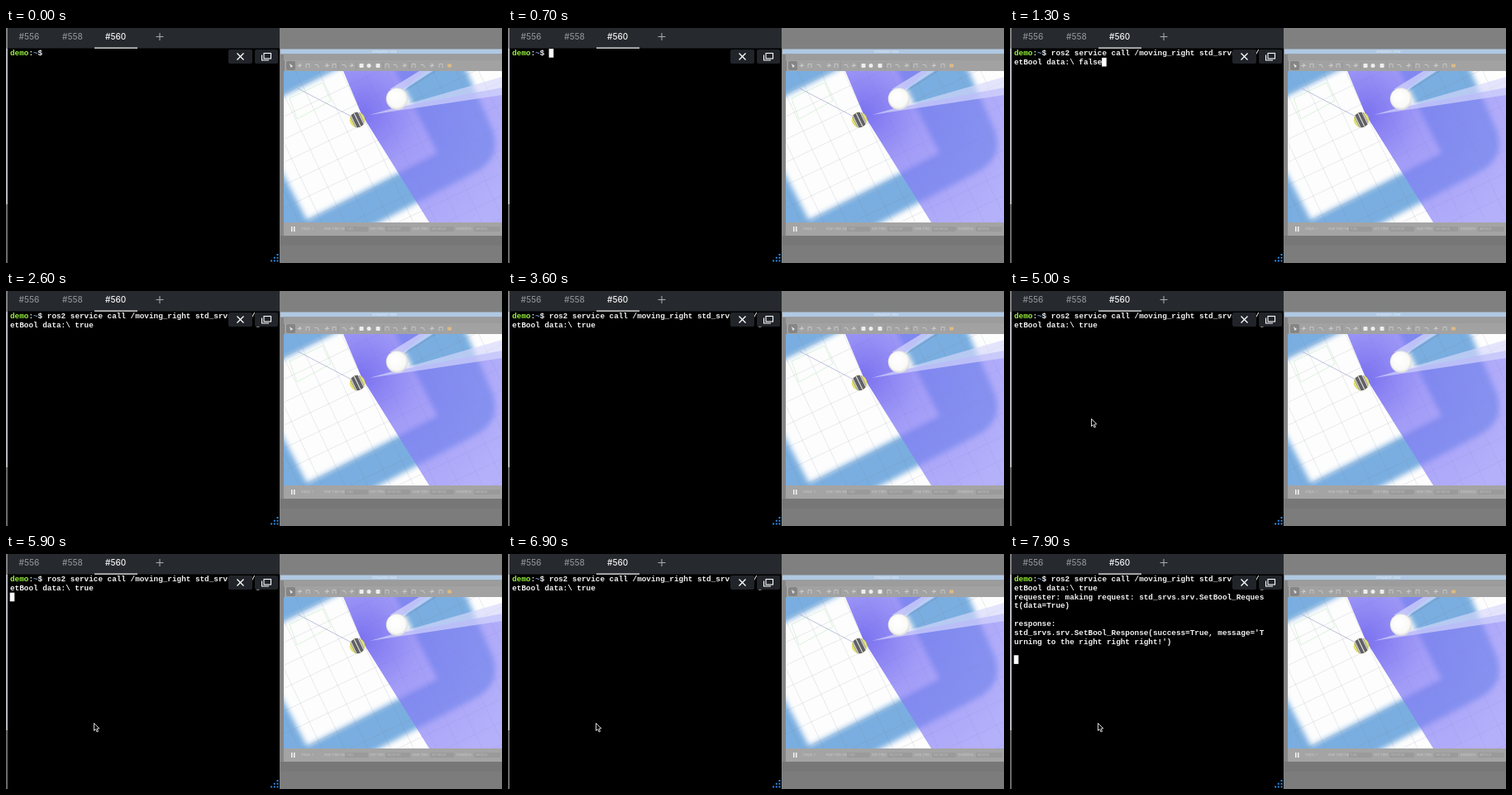
An HTML page with a canvas for the animation above (8 s loop, 600 px wide and 284 px high).

```html
<!DOCTYPE html>
<html lang="en">
<head>
<meta charset="utf-8">
<title>Robot terminal</title>
<style>
html, body { margin: 0; width: 100%; height: 100%; overflow: hidden; background: #808080; }
canvas { display: block; width: 600px; height: 284px; }
</style>
</head>
<body>
<canvas id="stage" width="600" height="284"></canvas>
<script>
const W = 600, H = 284, LOOP = 8000;
const CHAR = 5.6, LINE = 10.8, LEFT = 5, TOP = 30.7;
const MONO = 'bold 9.33px "Liberation Mono", monospace';
const SANS = 'Inter, sans-serif';
const BLINK = 600;

const COMMAND = 'ros2 service call /moving_right std_srvs/srv/S';
const REQUEST = ['requester: making request: std_srvs.srv.SetBool_Reques', 't(data=True)'];
const RESPONSE = ['', 'response:', "std_srvs.srv.SetBool_Response(success=True, message='T",
  "urning to the right right right!')"];

// Key times in ms
const RECALL = 1000, RECALL_NEXT = 1500, ENTER = 5800, SENT = 7600, REPLY = 7700;
const POINTER = { show: 4700, from: 5150, to: 5550 };

const stage = document.getElementById('stage').getContext('2d');

function rect(c, color, x, y, w, h, r = 0) {
  c.fillStyle = color;
  c.beginPath();
  c.roundRect(x, y, w, h, r);
  c.fill();
}

function poly(c, color, ...points) {
  c.fillStyle = color;
  c.beginPath();
  points.forEach(p => c.lineTo(...p));
  c.closePath();
  c.fill();
}

function line(c, color, width, ...points) {
  c.strokeStyle = color;
  c.lineWidth = width;
  c.beginPath();
  points.forEach((p, i) => i ? c.lineTo(...p) : c.moveTo(...p));
  c.stroke();
}

function disc(c, color, x, y, r) {
  c.fillStyle = color;
  c.beginPath();
  c.arc(x, y, r, 0, Math.PI * 2);
  c.fill();
}

function label(c, text, x, y, font, color) {
  c.font = font;
  c.fillStyle = color;
  c.textBaseline = 'middle';
  c.fillText(text, x, y);
}

function drawTrack(c) {
  c.save();
  c.filter = 'blur(3px)';
  c.fillStyle = '#7aaee0';
  c.beginPath();
  c.moveTo(320, 40);
  c.lineTo(552, 40);
  c.lineTo(588, 122);
  c.quadraticCurveTo(602, 158, 564, 176);
  c.lineTo(432, 245);
  c.lineTo(320, 245);
  c.fill();
  poly(c, '#fdfdfd', [320, 90], [336, 82], [420, 40], [465, 40], [522, 151], [364, 232], [336, 178], [320, 147]);
  c.restore();
}

function drawGrid(c) {
  c.save();
  c.translate(425, 111);
  c.rotate(-0.445);
  for (let i = -12; i <= 12; i++) {
    const p = i * 25 + 8;
    line(c, 'rgba(120,125,135,.2)', 0.7, [p, -300], [p, 300]);
    line(c, 'rgba(120,125,135,.2)', 0.7, [-300, p], [300, p]);
  }
  c.restore();
}

function drawLaser(c) {
  const glow = c.createRadialGradient(430, 104, 5, 430, 104, 190);
  glow.addColorStop(0, 'rgba(108,98,238,.88)');
  glow.addColorStop(0.35, 'rgba(130,122,245,.74)');
  glow.addColorStop(1, 'rgba(143,136,248,.66)');
  poly(c, glow, [408, 52], [508, 52], [473, 80], [473, 96], [600, 72], [600, 235], [512, 235], [430, 104]);
  poly(c, 'rgba(216,218,252,.7)', [464, 74], [500, 52], [516, 52], [482, 74]);
  poly(c, 'rgba(216,218,252,.66)', [440, 105], [600, 59], [600, 81]);
}

function drawBall(c) {
  const shade = c.createRadialGradient(470, 82, 3, 473, 85.5, 13.5);
  shade.addColorStop(0, '#ffffff');
  shade.addColorStop(0.75, '#f9f9f6');
  shade.addColorStop(1, '#d8d8da');
  disc(c, shade, 473, 85.5, 13.3);
}

function drawRobot(c) {
  c.save();
  c.translate(425, 111);
  c.rotate(-0.45);
  disc(c, '#e2e070', 0, 0, 9.3);
  c.clip();
  rect(c, '#606066', -6, -10, 12, 20);
  [-5, 0, 5].forEach(x => line(c, '#e4e4e0', 1.1, [x, -9], [x, 9]));
  c.restore();
}

function drawWorld(c) {
  c.save();
  c.beginPath();
  c.rect(336, 52, 264, 183);
  c.clip();
  rect(c, '#fdfdfd', 336, 52, 264, 183);
  drawTrack(c);
  drawGrid(c);
  line(c, 'rgba(130,215,130,.4)', 0.7, [343, 85], [383, 66], [393, 88], [352, 110], [343, 85]);
  drawLaser(c);
  line(c, '#a3a6cc', 0.7, [353, 73], [418, 107]);
  line(c, 'rgba(110,110,150,.5)', 0.7, [482, 76], [520, 52]);
  drawBall(c);
  drawRobot(c);
  c.restore();
}

function drawToolbar(c) {
  rect(c, '#a2a2a2', 337, 39, 263, 13);
  rect(c, '#858585', 339, 40, 11, 11, 2);
  poly(c, '#e4e4e4', [343, 43], [347, 46], [344.5, 48]);
  const icons = [355, 365, 376, 388, 397, 409, 418, 430, 439, 450, 461, 471, 482, 493, 504, 515, 526];
  icons.forEach((x, i) => {
    if (i > 6 && i < 10) rect(c, '#eeeeee', x - 2.5, 43, 5, 5, i === 8 ? 2.5 : 1);
    else if (i % 3 === 0) line(c, '#cecece', 0.9, [x - 2.5, 45.5], [x + 2.5, 45.5], [x, 43], [x, 48]);
    else if (i % 3 === 1) line(c, '#cacaca', 0.9, [x - 2, 48], [x - 2, 43.5], [x + 2, 43.5], [x + 2, 48]);
    else line(c, '#cacaca', 0.9, [x + 2.5, 48], [x + 1, 44.5], [x - 2.5, 44.5]);
  });
  [402, 424, 456, 488].forEach(x => line(c, '#909090', 0.7, [x, 41], [x, 50]));
  rect(c, '#dcb985', 534, 43.5, 5, 4, 1);
}

function drawStatus(c) {
  rect(c, '#a4a4a4', 336, 235, 264, 16);
  rect(c, '#f4f4f4', 345, 240, 1.5, 6);
  rect(c, '#f4f4f4', 348, 240, 1.5, 6);
  const font = `4px ${SANS}`;
  const fields = [[357, 'Steps: 1'], [385, 'Real Time Factor:'], [440, 'Sim Time:'],
    [492, 'Real Time:'], [545, 'Iterations:']];
  fields.forEach(([x, text]) => label(c, text, x, 243, font, '#c8c8c8'));
  [[410, 28], [459, 30], [513, 29], [566, 32]].forEach(([x, w]) => rect(c, '#9a9a9a', x, 240, w, 6, 1));
  label(c, '1.00', 412, 243, font, '#c2c2c2');
  label(c, '00:07:41', 461, 243, font, '#c2c2c2');
  label(c, '00:08:02', 515, 243, font, '#c2c2c2');
  label(c, '461203', 568, 243, font, '#c2c2c2');
}

function drawDesktop(c) {
  rect(c, '#808080', 0, 0, W, H);
  rect(c, '#868686', 331, 25, 5, 226);
  rect(c, '#b0c8e2', 332, 25.5, 268, 6);
  rect(c, '#9c9c9c', 336, 31.5, 264, 8);
  label(c, 'Simulation view', 443, 28.5, `4px ${SANS}`, '#e4eef8');
  drawToolbar(c);
  drawWorld(c);
  drawStatus(c);
  rect(c, '#777777', 332, 251, 268, 12);
  rect(c, '#7c7c7c', 332, 263, 268, 21);
  rect(c, '#b4b8bc', 0, 25, 2, 188);
  rect(c, '#6a6a6a', 0, 213, 2, 71);
}

function drawPanel(c) {
  rect(c, '#26292e', 2, 0, 329, 25);
  rect(c, '#000000', 2, 24.5, 329, 259.5);
  const font = `500 10px ${SANS}`;
  label(c, '#556', 15.5, 10.5, font, '#8b8e93');
  label(c, '#558', 68, 10.5, font, '#8b8e93');
  label(c, '#560', 120, 10.5, font, '#f4f4f4');
  line(c, '#a4a6aa', 1.1, [181.5, 10.5], [190.5, 10.5]);
  line(c, '#a4a6aa', 1.1, [186, 6], [186, 15]);
  rect(c, '#f4f4f4', 107, 23.6, 52, 1.2);
}

function drawButtons(c) {
  rect(c, '#212429', 269, 26, 29, 17, 2);
  rect(c, '#212429', 301, 26, 28, 17, 2);
  line(c, '#ffffff', 1.3, [279.5, 30.5], [287.5, 38.5]);
  line(c, '#ffffff', 1.3, [287.5, 30.5], [279.5, 38.5]);
  c.strokeStyle = '#ffffff';
  c.lineWidth = 1.1;
  c.strokeRect(312, 30.5, 8.5, 6.5);
  line(c, '#ffffff', 1.1, [309.5, 32.5], [309.5, 39], [318, 39]);
  for (let row = 0; row < 3; row++) {
    for (let col = 0; col <= row; col++) {
      rect(c, '#2f8be6', 327.5 - col * 3.7, 273 + row * 3.7, 2, 2);
    }
  }
}

function layer(...painters) {
  const canvas = document.createElement('canvas');
  canvas.width = W;
  canvas.height = H;
  const c = canvas.getContext('2d');
  painters.forEach(paint => paint(c));
  return canvas;
}

const backdrop = layer(drawDesktop, drawPanel);
const buttons = layer(drawButtons);

function type(text, col, row, color = '#f0f0f0') {
  label(stage, text, LEFT + col * CHAR, TOP + row * LINE, MONO, color);
}

function screenAt(t) {
  if (t < RECALL) return { first: '', lines: [], col: 8, row: 0 };
  const value = t < RECALL_NEXT ? 'false' : 'true';
  const lines = ['etBool data:\\ ' + value];
  if (t < ENTER) return { first: COMMAND, lines, col: lines[0].length, row: 1 };
  if (t >= SENT) lines.push(...REQUEST);
  if (t >= REPLY) lines.push(...RESPONSE);
  return { first: COMMAND, lines, col: 0, row: lines.length + 1 + (t >= REPLY ? 1 : 0) };
}

function cursorOn(t) {
  const start = [RECALL, RECALL_NEXT, ENTER, SENT].filter(k => k <= t).pop() ?? -BLINK;
  return Math.floor((t - start) / BLINK) % 2 === 0;
}

function drawPointer(t) {
  if (t < POINTER.show) return;
  const p = Math.min(1, Math.max(0, (t - POINTER.from) / (POINTER.to - POINTER.from)));
  const e = p * p * (3 - 2 * p);
  stage.save();
  stage.translate(98.5 + 8 * e, 154.5 + 50 * e);
  stage.beginPath();
  [[0, 0], [0, 9], [2, 7.2], [3.6, 10.5], [5, 9.8], [3.5, 6.6], [6.3, 6.4]].forEach(q => stage.lineTo(...q));
  stage.closePath();
  stage.fillStyle = '#000000';
  stage.fill();
  stage.strokeStyle = '#eeeeee';
  stage.lineWidth = 0.9;
  stage.stroke();
  stage.restore();
}

function draw(t) {
  stage.drawImage(backdrop, 0, 0);
  type('demo', 0, 0, '#96f23c');
  type(':', 4, 0);
  type('~', 5, 0, '#729fcf');
  type('$', 6, 0);
  const { first, lines, col, row } = screenAt(t);
  type(first, 8, 0);
  lines.forEach((text, i) => type(text, 0, i + 1));
  if (cursorOn(t)) rect(stage, '#ffffff', LEFT + col * CHAR - 0.3, TOP + row * LINE - 5.6, CHAR, 10.6);
  stage.drawImage(buttons, 0, 0);
  if (t >= RECALL_NEXT) line(stage, '#a0a0a0', 0.9, [303, 43.3], [306.5, 43.3]);
  drawPointer(t);
}

function tick() {
  draw(performance.now() % LOOP);
  requestAnimationFrame(tick);
}
tick();
</script>
</body>
</html>
```
